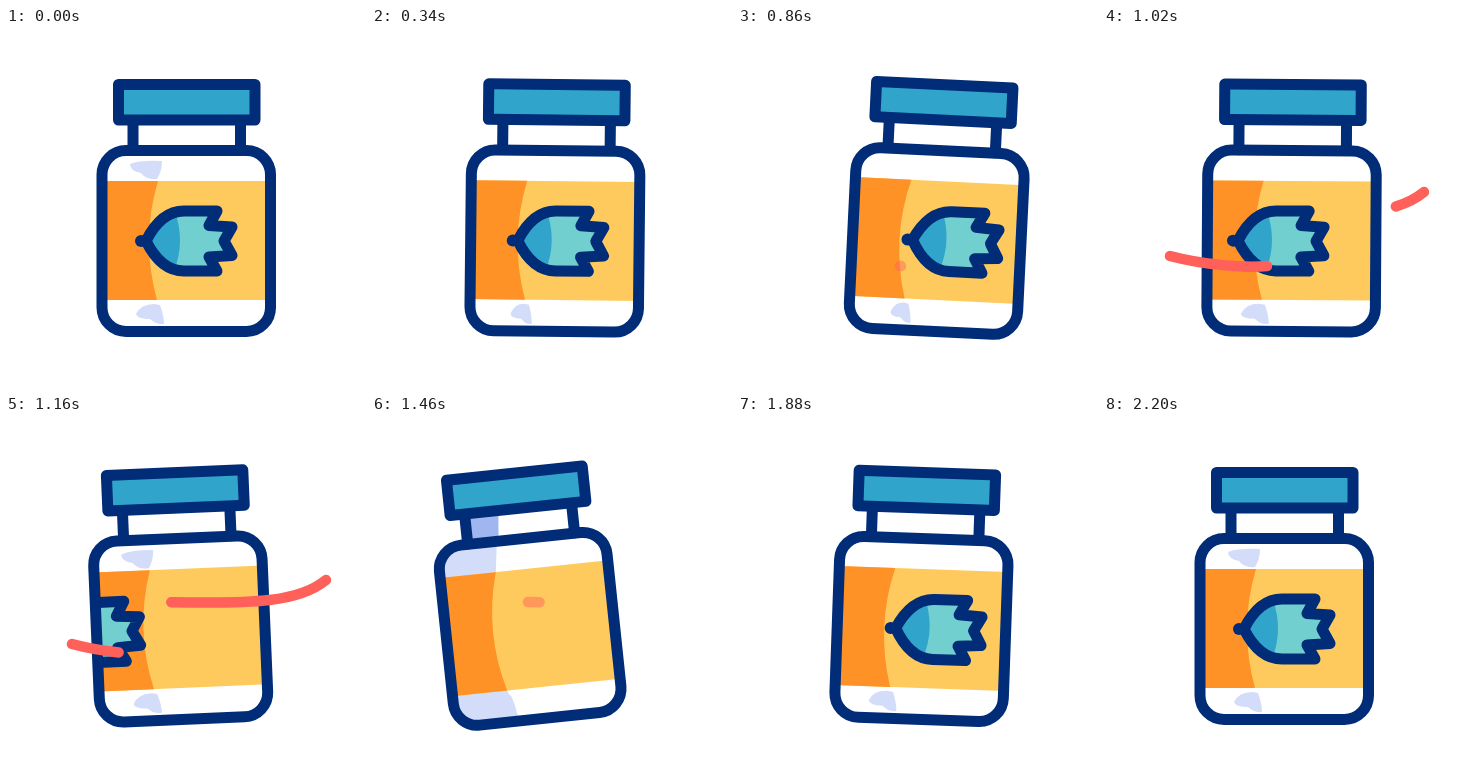
An HTML page for the animation above (2.4 s loop, 360 px wide and 360 px high).

```html
<!DOCTYPE html>
<html>
<head>
<meta charset="utf-8">
<style>
html, body { margin: 0; width: 100%; height: 100%; overflow: hidden; background: #fff; }
svg { display: block; width: 100vw; height: 100vh; }
.line { fill: none; stroke: #002c78; stroke-width: 11; stroke-linecap: round; stroke-linejoin: round; }
.shade { fill: #d3dcf9; }
.swoosh { fill: none; stroke: #ff6059; stroke-width: 10.5; stroke-linecap: round; }
</style>
</head>
<body>
<svg viewBox="0 0 360 360">
  <defs>
    <clipPath id="inside"><rect x="96" y="122.5" width="168.5" height="181" rx="24"/></clipPath>
    <clipPath id="petals"><use href="#leaf"/></clipPath>
    <path id="leaf" d="M140 213C149 195 162 183 178 183H211L203 197.500L226 199L218 213L226 227.500L203 229L211 243H178C162 243 149 231 140 213Z"/>
  </defs>
  <g id="jar">
    <path id="neckShade" fill="#9fb6f0" d="M127 92H161L158 122H127Z"/>
    <g clip-path="url(#inside)">
      <path id="bodyShade" class="shade" d="M90 117H157L152 153Q134.500 212 151 272L161 304H90Z"/>
      <path id="topPatch" class="shade" d="M124 136Q134 132 156 133Q156 143 151 151Q140 152 135 145Q124 143 124 136Z"/>
      <path id="lowPatch" class="shade" d="M-28 286Q-23 276 -10 276L-4 277Q0 288 0 296Q-8 297 -14 291Q-27 291 -28 286Z"/>
      <path fill="#ffca5d" d="M96 153H265V272H96Z"/>
      <path fill="#ff9227" d="M96 153H152Q134.500 212 151 272H96Z"/>
      <g id="flower">
        <g clip-path="url(#petals)">
          <path fill="#71cfcf" d="M130 175H235V250H130Z"/>
          <path fill="#31a4cb" d="M130 175H165Q183 212 165 250H130Z"/>
        </g>
        <use href="#leaf" class="line"/>
        <circle cx="135" cy="213" r="6" fill="#002c78"/>
      </g>
    </g>
    <path class="line" d="M127 92V122M234.500 92V122"/>
    <rect class="line" x="96" y="122.500" width="168.500" height="181" rx="24"/>
    <rect class="line" style="fill:#31a4cb" x="112.500" y="56.500" width="136.500" height="35.500"/>
  </g>
  <g id="swooshes">
    <path id="left" class="swoosh" pathLength="1" d="M163 238C140 240 100 237 66 228"/>
    <path id="right" class="swoosh" pathLength="1" d="M320 164C292 187 245 188 156 186"/>
  </g>
</svg>
<script>
const LOOP = 2400;
const $ = id => document.getElementById(id);
const set = (id, name, value) => $(id).setAttribute(name, value);
const show = (id, on) => set(id, 'visibility', on ? 'visible' : 'hidden');

const ramp = (t, a, b) => Math.max(0, Math.min(1, (t - a) / (b - a)));
const smooth = (t, a, b) => (1 - Math.cos(Math.PI * ramp(t, a, b))) / 2;
const easeOut = x => 1 - (1 - x) ** 2;

// The jar leans right, swings left, rebounds and settles.
function swing(t, leanEnd, right, left, rebound) {
  return right * smooth(t, 220, leanEnd)
    + (left - right) * smooth(t, 740, 1470)
    + (rebound - left) * smooth(t, 1470, 1870)
    - rebound * smooth(t, 1870, 2200);
}

// The flower winds up, leaves on the left and comes round from the right.
function flowerX(t) {
  return t < 1460
    ? 16 * smooth(t, 220, 640) - 172 * ramp(t, 860, 1250) ** 2
    : 180 * (1 - ramp(t, 1460, 2200)) ** 3;
}

function trim(id, tail, head) {
  show(id, head > 0 && tail < 1);
  set(id, 'stroke-dasharray', `${Math.max(.001, head - tail)} 3`);
  set(id, 'stroke-dashoffset', -tail);
}

function draw(t) {
  const shift = swing(t, 740, 22.7, -24.5, 4);
  const tilt = swing(t, 660, 3.4, -6, 2);
  set('jar', 'transform', `translate(${shift}) rotate(${tilt} 180 190)`);
  set('flower', 'transform', `translate(${flowerX(t)})`);

  const shaded = t > 1300 && t < 1680;
  show('neckShade', shaded);
  show('bodyShade', shaded);
  show('topPatch', Math.abs(tilt) < 2.5 && (t < 300 || t > 1080 && t < 1300 || t > 2050));
  const width = 1 - Math.sin(Math.PI * ramp(t, 220, 1000)) / 2;
  set('lowPatch', 'transform', `translate(158) scale(${width} 1)`);

  set('swooshes', 'opacity', ramp(t, 830, 900) - ramp(t, 1420, 1500));
  trim('left', ramp(t, 1050, 1265), ramp(t, 840, 1020) ** 2);
  trim('right', ramp(t, 1270, 1475), easeOut(ramp(t, 1000, 1210)));
}

function frame(now) {
  draw(now % LOOP);
  requestAnimationFrame(frame);
}
draw(0);
requestAnimationFrame(frame);
</script>
</body>
</html>
```
